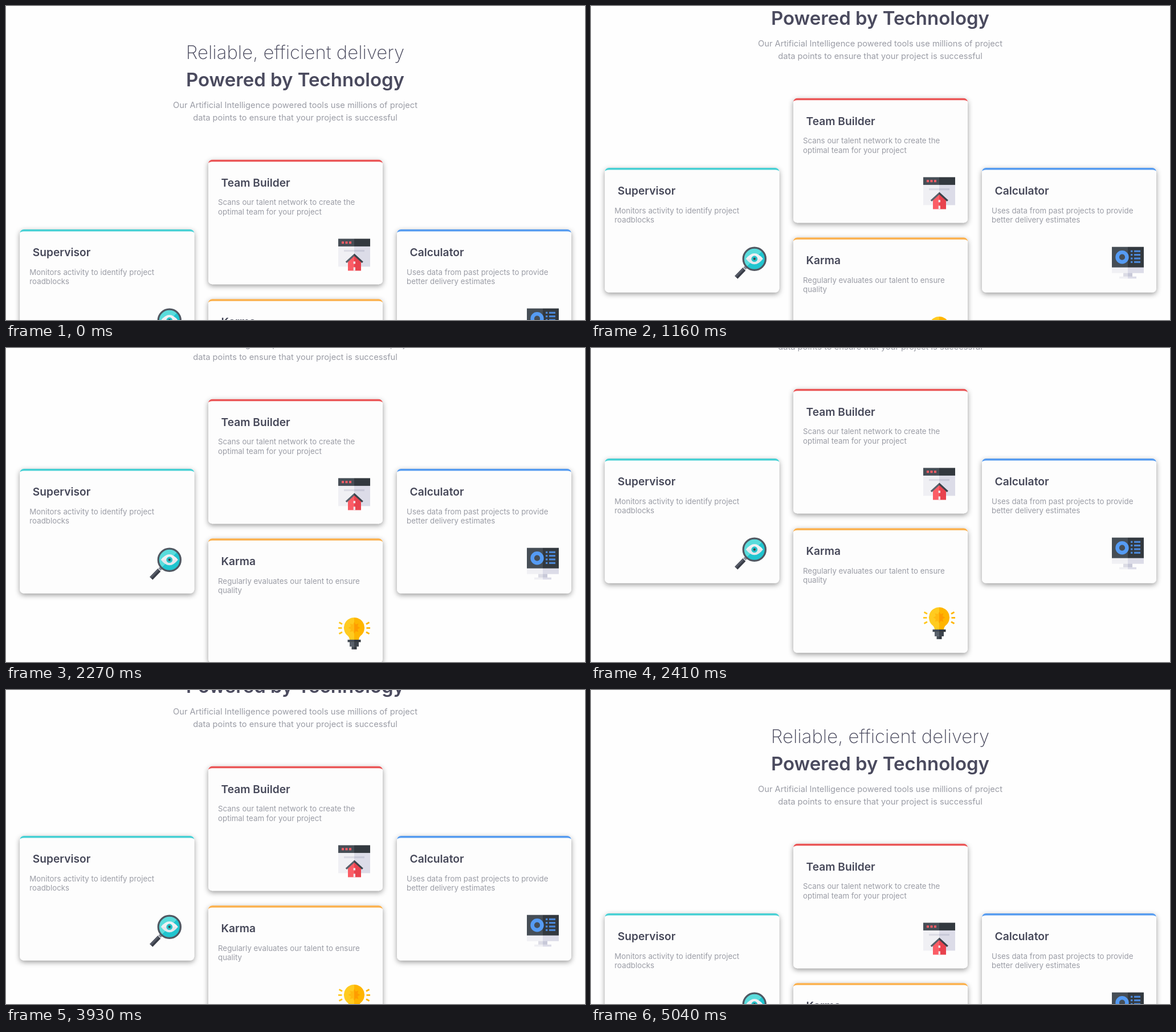
An HTML page for the animation above (5.67 s loop, 1016 px wide and 551 px high).

```html
<!DOCTYPE html>
<html lang="en">
<head>
<meta charset="utf-8">
<title>Powered by Technology</title>
<style>
  html, body { margin: 0; width: 100%; height: 100%; overflow: hidden; background: #fefefe; }
  svg { display: block; width: 1016px; height: 551px; }
  text { font-family: Inter, "Open Sans", sans-serif; font-optical-sizing: none; fill: #9b9da6; }
  .head { text-anchor: middle; fill: #4a4a5e; }
  .thin { font-size: 32.9px; font-weight: 200; }
  .bold { font-size: 33px; font-weight: 600; }
  .lead { font-size: 14.68px; text-anchor: middle; }
  .name { font-size: 19.2px; font-weight: 600; fill: #464859; }
  .note { font-size: 13.32px; }
</style>
</head>
<body>
<svg viewBox="0 0 1016 551">
  <defs>
    <filter id="shadow" x="-10%" y="-10%" width="120%" height="125%">
      <feDropShadow dx="0" dy="3" stdDeviation="5" flood-color="#000" flood-opacity=".4"/>
    </filter>
  </defs>
  <g id="page">
    <text class="head thin" x="507.5" y="93.3">Reliable, efficient delivery</text>
    <text class="head bold" x="507.5" y="141">Powered by Technology</text>
    <text class="lead" x="507.5" y="179">Our Artificial Intelligence powered tools use millions of project</text>
    <text class="lead" x="507.5" y="201">data points to ensure that your project is successful</text>
  </g>
</svg>
<script>
const page = document.getElementById('page');
const defs = document.querySelector('defs');

// Two-tone fills: hard colour change at the middle of a 56px icon
const tones = {
  dark: ['#464e56', '#33393f'],
  slate: ['#59616b', '#3c434b'],
  pale: ['#f0f0f4', '#dcdce8'],
  grey: ['#dcdce5', '#c8c9d8'],
  red: ['#fb5d66', '#e8434e'],
  gold: ['#ffcb20', '#ffb500'],
  amber: ['#ffba10', '#ff9c00']
};
for (const [id, [a, b]] of Object.entries(tones)) {
  defs.innerHTML += `<linearGradient id="${id}" gradientUnits="userSpaceOnUse" x1="0" x2="56" y1="0" y2="0">
    <stop offset=".5" stop-color="${a}"/><stop offset=".5" stop-color="${b}"/></linearGradient>`;
}
defs.innerHTML += `<linearGradient id="teal" gradientUnits="userSpaceOnUse" x1="19" y1="5" x2="50" y2="37">
  <stop offset=".5" stop-color="#5adcdc"/><stop offset=".5" stop-color="#20c5cf"/></linearGradient>`;

const rect = (x, y, w, h, fill) =>
  `<rect x="${x}" y="${y}" width="${w}" height="${h}" fill="${tones[fill] ? `url(#${fill})` : fill}"/>`;
const path = (d, fill) => `<path d="${d}" fill="${tones[fill] ? `url(#${fill})` : fill}"/>`;
const ring = (x, y, r, fill, extra = '') => `<circle cx="${x}" cy="${y}" r="${r}" fill="${fill}" ${extra}/>`;

function house() {
  return rect(0, 13, 56, 36, 'pale') + rect(0, 0, 56, 13.5, 'dark')
    + [6, 12.5, 19].map(x => rect(x, 4.8, 4, 4, '#f95d66')).join('')
    + rect(10, 19.5, 36, 3.3, 'grey')
    + path('M28.3 29L17 40V56H40V40Z', 'red')
    + path('M28.3 26L12.7 40.4L15 42.7L28.3 30.4L41.6 42.7L43.9 40.4Z', 'slate')
    + rect(26.6, 40, 3.4, 4, '#f0f0f4') + rect(26.6, 50, 3.4, 6, '#f0e4e8');
}

function lens() {
  return path('M18 33L22 37L19 40L15 36Z', '#8b909b')
    + path('M14 36.5L19 41.5L5 56L0 51Z', '#3a3e48')
    + path('M14 36.5L16.5 39L2.5 53.5L0 51Z', '#555a66')
    + ring(34.5, 21, 19.6, 'url(#teal)', 'stroke="#505862" stroke-width="3.2"')
    + path('M19.5 21Q34.5 2 49.5 21Q34.5 40 19.5 21Z', '#e4e7ec')
    + path('M19.5 21Q34.5 2 49.5 21Z', '#f0f0f3')
    + ring(34.5, 21, 5.4, '#25c3ca') + ring(34.5, 21, 2.1, '#3c434b');
}

function monitor() {
  const rows = [6, 12.3, 18.7, 25].map(y =>
    rect(33, y, 3.4, 3.2, '#4c88d8') + rect(39, y, 11, 3.2, '#4c88d8')).join('');
  return rect(20, 45, 16, 8, 'grey') + rect(13, 52, 30, 3.6, 'pale')
    + rect(0, 35, 56, 11, 'pale') + rect(0, 0, 56, 36, 'dark')
    + ring(18, 18, 8.4, 'none', 'stroke="#559bf3" stroke-width="6.6"') + rows;
}

function bulb() {
  const gear = Array.from({ length: 16 }, (_, i) => {
    const r = i % 2 ? 6.5 : 10.5, a = i * Math.PI / 8;
    return `${28 + r * Math.cos(a)} ${18 + r * Math.sin(a)}`;
  }).join('L');
  const rays = (d, color) => `<path d="${d}" stroke="${color}" stroke-width="2.8" fill="none"/>`;
  return rays('M0 18.5H6.5M1.5 8.5L7 11.5M1.5 28.5L7 25.5', '#ffc61c')
    + rays('M56 18.5H49.5M54.5 8.5L49 11.5M54.5 28.5L49 25.5', '#ffb500')
    + path('M28 0A18 18 0 0 1 39 32.3Q36 35 36 39H20Q20 35 17 32.3A18 18 0 0 1 28 0Z', 'gold')
    + path(`M${gear}Z`, 'amber')
    + rect(16.5, 39, 23, 4.3, 'dark') + rect(20, 43, 16, 8, 'slate') + rect(23.5, 51, 9, 5, 'dark');
}

function card(x, y, color, name, lines, icon) {
  const w = 306, h = 218.5, r = 7;
  const top = `M0 ${r}A${r} ${r} 0 0 1 ${r} 0H${w - r}A${r} ${r} 0 0 1 ${w} ${r}`;
  const side = `V${h - r}A${r} ${r} 0 0 1 ${w - r} ${h}H${r}A${r} ${r} 0 0 1 0 ${h - r}Z`;
  page.innerHTML += `<g transform="translate(${x} ${y})">
    <path d="${top}${side}" fill="#fdfdfd" filter="url(#shadow)"/>
    <path d="${top}A${r} 3.4 0 0 0 ${w - r} 3.6H${r}A${r} 3.4 0 0 0 0 ${r}Z" fill="${color}"/>
    <text class="name" x="22.5" y="47">${name}</text>
    ${lines.map((s, i) => `<text class="note" x="17" y="${79.5 + 16.6 * i}">${s}</text>`).join('')}
    <g transform="translate(228 138.7)">${icon}</g></g>`;
}

card(355, 269.7, '#ea5455', 'Team Builder',
  ['Scans our talent network to create the', 'optimal team for your project'], house());
card(24.3, 392, '#46d0d4', 'Supervisor',
  ['Monitors activity to identify project', 'roadblocks'], lens());
card(686, 392, '#559bf0', 'Calculator',
  ['Uses data from past projects to provide', 'better delivery estimates'], monitor());
card(355, 514.2, '#fbb04c', 'Karma',
  ['Regularly evaluates our talent to ensure', 'quality'], bulb());

// Scroll position by time in ms, held until the next entry
const loop = 5670;
const scroll = [
  [0, 0],
  [950, 5], [1020, 28], [1090, 66], [1160, 108], [1230, 144], [1300, 166], [1370, 174.4],
  [2270, 180], [2340, 192.5], [2410, 198],
  [3730, 192.7], [3800, 172], [3870, 136], [3940, 104], [4010, 75], [4080, 48], [4150, 30], [4270, 23.5],
  [4830, 18], [4900, 8], [4970, 2], [5040, 0],
  [loop, 0]
];
page.animate(
  scroll.map(([t, y]) => ({ offset: t / loop, transform: `translateY(${-y}px)`, easing: 'step-end' })),
  { duration: loop, iterations: Infinity }
);
</script>
</body>
</html>
```
